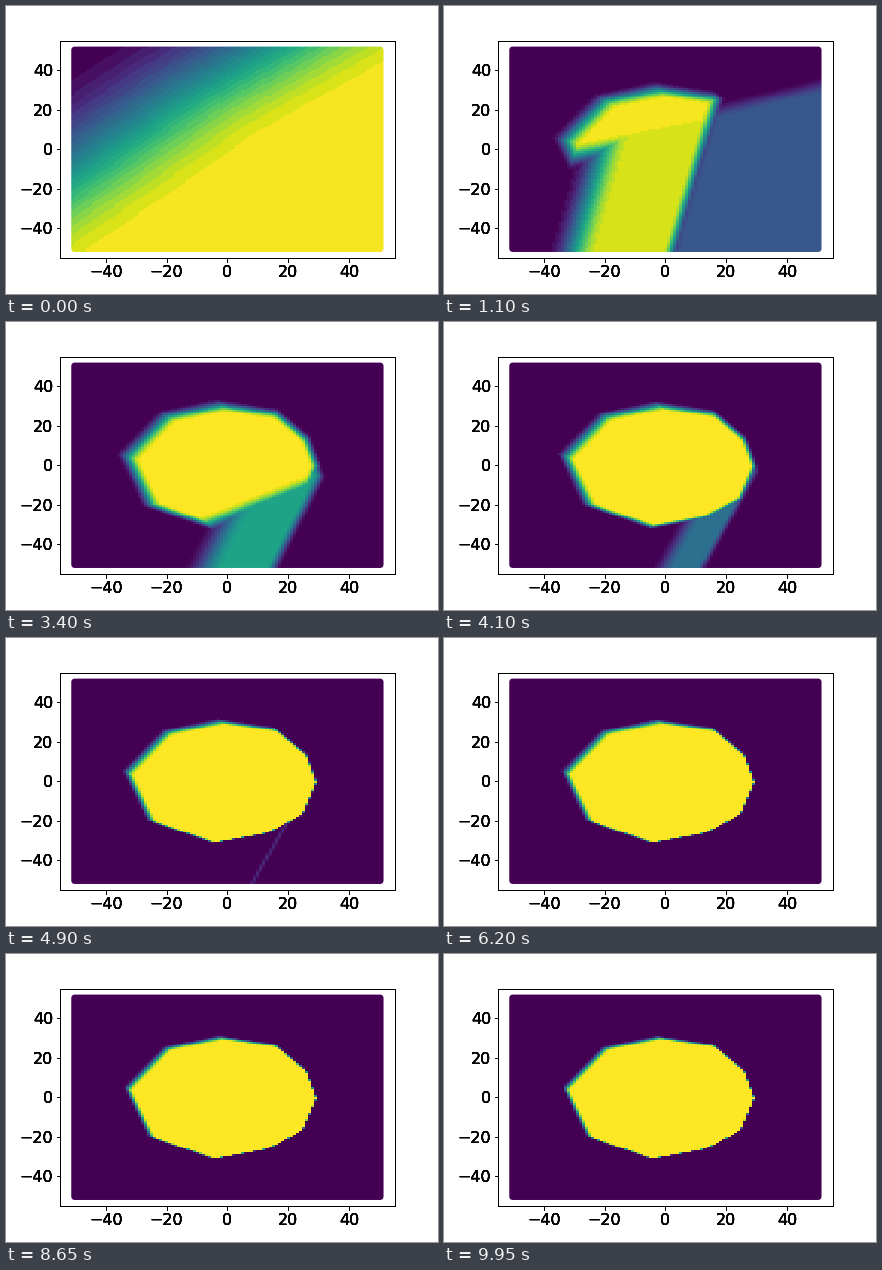
Animation of 432 by 288 pixels, one loop 10000 ms. Source, as a matplotlib script:

```python
import numpy as np
import matplotlib.pyplot as plt
from matplotlib.animation import FuncAnimation
from matplotlib.patches import FancyBboxPatch
from matplotlib.transforms import IdentityTransform

W, H = 432, 288
FRAMES, INTERVAL = 200, 50
BANDS = 24
HALF_X, HALF_Y = 51.3, 51.95

# One cell per visible scatter marker
X, Y = np.meshgrid(np.linspace(-HALF_X, HALF_X, 103),
                   np.linspace(HALF_Y, -HALF_Y, 104))

# Outward normals of the polygon that closes in on the disk, in degrees
NORMALS = np.array([147, 108, 77, 38, 14, -16, -51, -74, -119, -162])


def ramp(depth, width):
    """Banded smooth step, one half where depth is zero."""
    u = np.clip(0.5 + depth / width, 0, 1)
    return np.round(u * u * (3 - 2 * u) * BANDS) / BANDS


def inside(angle, radius, width):
    """Half-plane whose edge lies at radius along the given normal."""
    a = np.radians(angle)
    return ramp(radius - X * np.cos(a) - Y * np.sin(a), width)


def disk_edges(frame, early, fade):
    """Polygon edges; fade opens them into one broad diagonal slope."""
    turn = (NORMALS - 135 + 180) % 360 - 180
    angles = 135 + turn * (1 - 0.85 * fade)
    opening = 120 * fade * (1 - np.cos(np.radians(turn))) ** 2
    radii = 29.3 - 0.9 * np.cos(np.radians(NORMALS)) + opening
    soft = 0.4 + 0.9 * (1 - np.cos(np.radians(NORMALS + 40))) ** 2
    widths = soft * (1.75 - 0.0045 * frame) + 4.5 * early + 64 * fade
    return [inside(*edge) for edge in zip(angles, radii, widths)]


def field(frame):
    fade = max(0, 1 - frame / 22) ** 1.5
    early = np.clip((98 - frame) / 40, 0, 1)

    edges = disk_edges(frame, early, fade)
    top = [e for e, n in zip(edges, NORMALS) if n > 0]

    # The lower edge of the body sinks and tilts
    cut = inside(16 + 0.33 * (frame - 22) - 90,
                 0.6 * (frame - 30) + 150 * fade, 2 + 12 * early)

    # Two leaning lines bound the tail; both slide along the bottom
    lean = np.radians(max(83 - 0.17 * frame, 70))
    across = X * np.sin(lean) - (Y + 50) * np.cos(lean)
    left_x = -30 + 0.5 * (frame - 22) - 150 * fade
    right_x = np.interp(frame, [22, 41, 68, 98], [2.5, 17, 15, 9]) + 150 * fade
    left = ramp(across - left_x, 1 + 16 * early)
    right = ramp(right_x - across, 1 + 5 * early)
    bound = ramp(right_x + 20 * (1 - early) - across, 1 + 5 * early)

    body_peak = np.interp(frame, [22, 60], [0.985, 1])
    tail_peak = np.interp(frame, [22, 41, 68, 98, 130],
                          [0.94, 0.75, 0.58, 0.12, 0])
    wing_peak = 0.27 * max(0, (41 - frame) / 19)

    body = body_peak * np.min(edges + [cut, bound], axis=0)
    tail = tail_peak * np.min(top + [left, right], axis=0)
    wing = wing_peak * np.minimum(inside(111, 12, 9), 1 - right)
    return np.max([body, tail, wing], axis=0)


plt.rcParams.update({"font.family": "DejaVu Sans", "font.size": 16,
                     "figure.subplot.bottom": 0.125})
fig = plt.figure(figsize=(W / 72, H / 72), dpi=72)

# Stacked axes give the tick labels their heavy look
layers = [fig.add_subplot() for _ in range(5)]
for layer in layers:
    layer.patch.set_visible(False)

ax = layers[0]
image = ax.imshow(field(0), cmap="viridis", vmin=0, vmax=1,
                  interpolation="nearest", aspect="auto",
                  extent=(-HALF_X, HALF_X, -HALF_Y, HALF_Y))

for layer in layers:
    layer.set(xlim=(-55, 55), ylim=(-55, 55),
              xticks=range(-40, 41, 20), yticks=range(-40, 41, 20))

corner = ax.transData.transform((-HALF_X, -HALF_Y))
size = ax.transData.transform((HALF_X, HALF_Y)) - corner
rounded = FancyBboxPatch(corner, *size,
                         boxstyle="round,pad=0,rounding_size=3.7",
                         transform=IdentityTransform())
image.set_clip_path(rounded)


def update(frame):
    image.set_data(field(frame))
    return [image]


anim = FuncAnimation(fig, update, frames=FRAMES, interval=INTERVAL,
                     repeat=True, repeat_delay=0, blit=False)
plt.show()
```
